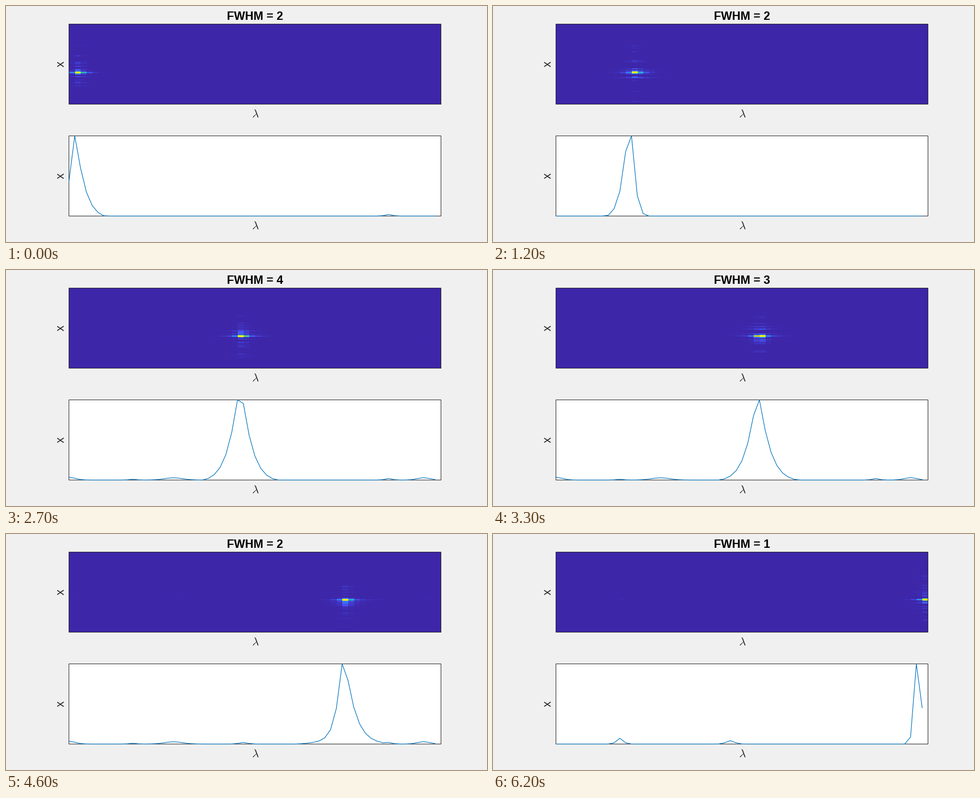
These frames come from a looping animation (967 by 477 pixels, 6.3 s). A matplotlib script:

```python
import numpy as np
import matplotlib.pyplot as plt
from matplotlib.animation import FuncAnimation
from matplotlib.colors import LinearSegmentedColormap
from matplotlib.patches import Rectangle

W, H, DPI = 967, 477, 64
PX = 72 / DPI                     # points per pixel
FRAMES, INTERVAL = 63, 100
COLS = 64
LEFT, RIGHT = 126.5, 874.5
MAP_TOP, MAP_BOTTOM = 36, 199     # whole pixel rows of the intensity map
PLOT_TOP, PLOT_BOTTOM = 262.5, 424.5
INK = "#262626"
FONT = 23.47 * PX

plt.rcParams["mathtext.fontset"] = "cm"
plt.rcParams["font.family"] = "Liberation Sans"

PARULA = LinearSegmentedColormap.from_list("parula", [
    (0.2422, 0.1504, 0.6603), (0.2810, 0.3228, 0.9579),
    (0.1786, 0.5289, 0.9682), (0.0689, 0.6948, 0.8394),
    (0.2161, 0.7843, 0.5923), (0.6720, 0.7793, 0.2227),
    (0.9970, 0.7659, 0.2199), (0.9769, 0.9839, 0.0805)], N=256)

# Key points of the travelling peak, joined by straight lines.
TIMES = (0, 12, 27, 39, 46, 53, 62)
CENTRE = (1, 12.7, 29.45, 40, 47.2, 55, 62)
LEFT_WIDTH = (1.2, 1.3, 2, 1.9, 1.2, 1.8, 0.525)
RIGHT_WIDTH = (1.8, 0.9, 2, 2.1, 1.9, 0.9, 1.26)
TAIL = (0, 0, 0.02, 0.06, 0.1, 0.3, 0)

# Ripples on the base line: column, width, height at start, middle and end.
RIPPLES = ((0, 1.5, 0, 0.035, 0), (11, 0.8, 0, 0.01, 0.072),
           (18, 2.2, 0, 0.028, 0), (30, 1, 0, 0.02, 0.042),
           (55, 0.8, 0.02, 0.02, 0), (61, 1.5, 0, 0.03, 0))

cols = np.arange(COLS)
rows = np.arange(MAP_TOP, MAP_BOTTOM) + 0.5


def floor_at(frame):
    total = np.zeros(COLS)
    for col, width, start, middle, end in RIPPLES:
        height = np.interp(frame, (0, 12, 27, 53, 62),
                           (start, 0, middle, middle, end))
        total += height * np.exp(-((cols - col) / width) ** 2)
    return total


def curve_at(frame):
    """Lopsided peak with a long tail, scaled to a height of one."""
    centre, wl, wr, tail = (np.interp(frame, TIMES, track) for track in
                            (CENTRE, LEFT_WIDTH, RIGHT_WIDTH, TAIL))
    d = np.abs(cols - centre)
    width = np.where(cols < centre, wl, wr)
    peak = (1 - tail) * np.exp(-(d / width) ** 1.2) + tail * np.exp(-d / 6)
    peak = np.clip(peak / peak.max() - 0.03, 0, None) / 0.97
    return np.maximum(peak, floor_at(frame))


def map_at(frame, curve):
    """Bright spot with a horizontal streak and fine vertical speckle."""
    hot = frame + 1.2 + 1.1 * np.exp(-((frame - 27) / 6) ** 2)
    core = np.exp(-np.abs(cols - min(hot, COLS - 1)) / 0.9)
    core /= core.max()
    streak = np.maximum(core, 0.35 * curve)
    y0 = 134.5 - 2 * frame / (FRAMES - 1)
    height = 1 + 1.4 * streak
    grid = streak * np.exp(-((rows[:, None] - y0) / height) ** 4)

    rng = np.random.default_rng(700 + frame)
    for dy in np.clip(rng.normal(0, 24, 26), -55, 58):
        level = 0.04 + 0.3 * np.exp(-abs(dy) / 9)
        level *= rng.uniform(0.5, 1.2)
        top = int(y0 + dy) - MAP_TOP
        band = grid[top:top + rng.integers(1, 3)]
        np.maximum(band, level * core ** rng.uniform(0.5, 2.5), out=band)
    return grid


fig = plt.figure(figsize=(W / DPI, H / DPI), dpi=DPI, facecolor="#f0f0f0")
ax = fig.add_axes([0, 0, 1, 1])
ax.axis("off")


def box(top, bottom, fill):
    ax.add_patch(Rectangle((LEFT, top), RIGHT - LEFT, bottom - top, fc=fill,
                           ec=INK, lw=1.1 * PX, snap=False, zorder=2))


image = ax.imshow(np.zeros((rows.size, COLS)), cmap=PARULA,
                  vmin=0, vmax=1, aspect="auto", interpolation="nearest",
                  extent=(LEFT, RIGHT, MAP_BOTTOM, MAP_TOP), zorder=1)
box(36.5, 198.5, "none")
box(PLOT_TOP, PLOT_BOTTOM, "white")
xs = LEFT + cols * (RIGHT - LEFT) / COLS
line, = ax.plot(xs, np.full(COLS, PLOT_BOTTOM), color="#0072bd",
                lw=1.25 * PX, snap=False, zorder=3)
title = ax.text(501, 28, "", size=FONT, weight="bold", color="black",
                ha="center", va="baseline")
for middle, base in ((117.5, 225), (343.5, 451)):
    ax.text(116.5, middle, "x", size=FONT, color=INK, rotation=90,
            rotation_mode="anchor", ha="center", va="baseline")
    ax.text(501, base, r"$\lambda$", size=FONT, color=INK,
            ha="center", va="baseline")
ax.set_xlim(0, W)
ax.set_ylim(H, 0)


def draw(frame):
    curve = curve_at(frame)
    image.set_data(map_at(frame, curve))
    line.set_ydata(PLOT_BOTTOM - curve * (PLOT_BOTTOM - PLOT_TOP))
    title.set_text(f"FWHM = {np.count_nonzero(curve > 0.5)}")
    return image, line, title


anim = FuncAnimation(fig, draw, frames=FRAMES, interval=INTERVAL,
                     repeat=True, repeat_delay=0)
plt.show()
```
